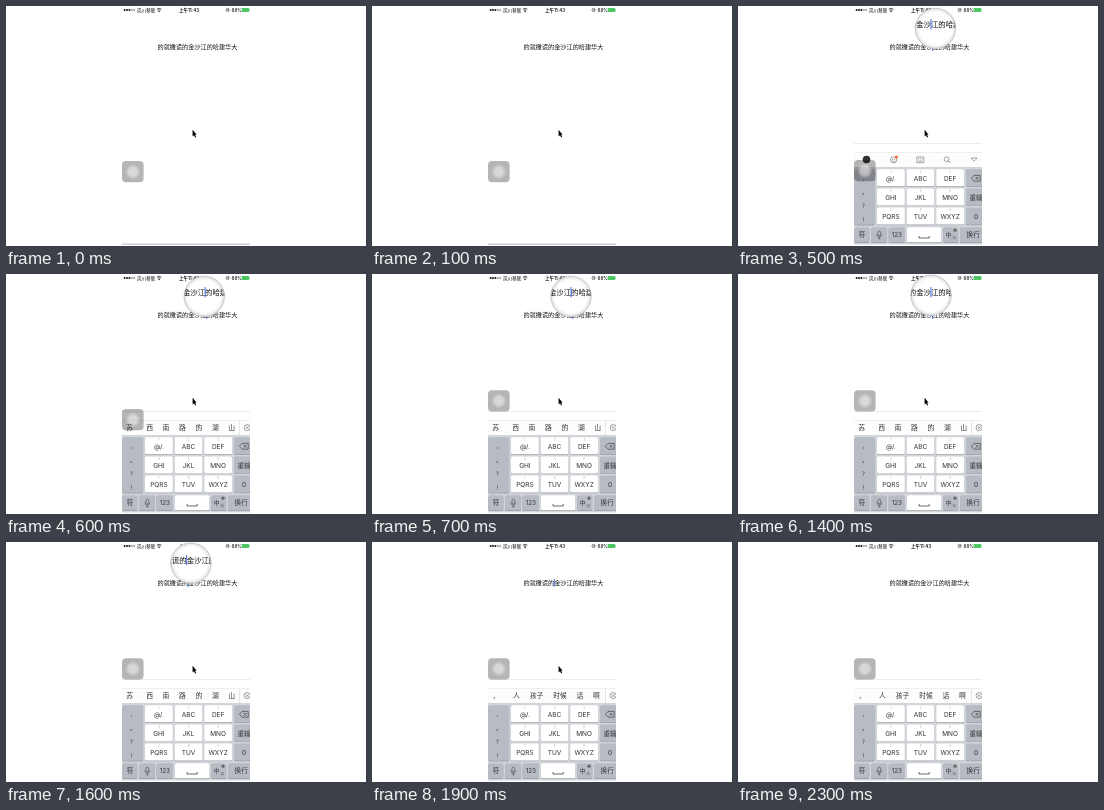
An HTML page with a canvas that plays this animation: 360 px wide and 240 px high, repeating every 2400 ms.

```html
<!DOCTYPE html>
<html lang="zh-CN">
<head>
<meta charset="utf-8">
<style>
html, body { margin: 0; width: 100%; height: 100%; overflow: hidden; background: #fff; }
canvas { display: block; width: 360px; height: 240px; }
</style>
</head>
<body>
<canvas id="stage" width="360" height="240"></canvas>
<script>
const ctx = document.getElementById('stage').getContext('2d');
const LOOP = 2400, TICK = 100;
const CJK = '"Noto Sans CJK SC", "Noto Sans CJK", sans-serif';
const LATIN = 'Inter, ' + CJK;
const LINE = '的就撒谎的金沙江的哈建华大';
const LINE_X = 151.5, LINE_Y = 41, PITCH = 6.15, ZOOM = 1.2;
const INK = '#333', ICON = '#666', BLUE = '#4468e8';

function text(str, x, y, size, { align = 'center', color = INK, font = CJK, weight = 400 } = {}) {
  ctx.font = `${weight} ${size}px ${font}`;
  ctx.textAlign = align;
  ctx.fillStyle = color;
  ctx.fillText(str, x, y + size * 0.37);
}

function rect(x, y, w, h, color) {
  ctx.fillStyle = color;
  ctx.fillRect(x, y, w, h);
}

function round(x, y, w, h, r, color) {
  ctx.beginPath();
  ctx.roundRect(x, y, w, h, r);
  ctx.fillStyle = color;
  ctx.fill();
}

function disc(x, y, r, color) {
  ctx.beginPath();
  ctx.arc(x, y, r, 0, Math.PI * 2);
  ctx.fillStyle = color;
  ctx.fill();
}

function ring(x, y, r, color = ICON, width = 0.6) {
  ctx.beginPath();
  ctx.arc(x, y, r, 0, Math.PI * 2);
  ctx.strokeStyle = color;
  ctx.lineWidth = width;
  ctx.stroke();
}

function path(d, color = ICON, width = 0.6) {
  ctx.strokeStyle = color;
  ctx.lineWidth = width;
  ctx.stroke(new Path2D(d));
}

function statusBar() {
  for (let i = 0; i < 5; i++) {
    if (i < 3) disc(118.6 + i * 2.4, 4, 1, '#111');
    else ring(118.6 + i * 2.4, 4, 0.8, '#333', 0.4);
  }
  text('岚川移联', 131, 4, 4.6, { align: 'left', color: '#111', weight: 500 });
  path('M150.8 3.2Q153.1 1.2 155.4 3.2M151.7 4.3Q153.1 3.1 154.5 4.3', '#111', 0.7);
  disc(153.1, 5.5, 0.7, '#111');
  text('上午11:43', 183, 4, 4.5, { font: LATIN, color: '#111', weight: 600 });
  ring(221.6, 4, 1.6, '#333', 0.6);
  path('M220.9 4H222.4V3', '#333', 0.6);
  text('88%', 225.6, 4, 4.5, { align: 'left', font: LATIN, color: '#111', weight: 500 });
  round(235.6, 2, 7.6, 4, 0.7, '#4cc764');
  rect(243.2, 3.4, 0.6, 1.4, '#4cc764');
}

function key(x, y, w, h, color = '#fff') {
  round(x, y + 0.7, w, h, 1.5, '#9a9ea5');
  round(x, y, w, h, 1.5, color);
}

function toolbar() {
  disc(128.5, 153.5, 3.8, '#333');
  ring(155.6, 153.9, 3.1);
  disc(154.6, 153.2, 0.5, ICON);
  disc(156.6, 153.2, 0.5, ICON);
  path('M154 154.8Q155.6 156.6 157.2 154.8');
  disc(158.4, 151, 1.5, '#f26a35');
  path('M178.8 151H185.8V156.6H178.8ZM180.4 155H184.2M180.2 152.8H181.2M181.9 152.8H182.9M183.6 152.8H184.6');
  ring(208.6, 153.2, 2.4);
  path('M210.3 154.9L212.2 156.8', ICON, 0.8);
  path('M233.2 152L236.2 155.2L239.2 152Z', ICON);
}

function candidates(words) {
  for (const [word, x] of words) text(word, x, 153.6, 6.8);
  rect(233, 147, 0.6, 14, '#d5d5d5');
  ring(241.2, 153.6, 3.1);
  path('M239.8 152.2L242.6 155M242.6 152.2L239.8 155');
}

const AFTER_RIVER = [['苏', 123.6], ['西', 143.6], ['南', 160], ['路', 176.4], ['的', 193], ['湖', 209.4], ['山', 225.6]];
const AFTER_DE = [['，', 124], ['人', 144.4], ['孩子', 164.6], ['时候', 188], ['话', 208], ['啊', 224.4]];

function keyboard(words) {
  const grey = '#b7bbc3';
  rect(116, 146, 128, 15, '#fdfdfd');
  rect(116, 146, 128, 0.6, '#e6e6e6');
  rect(116, 161, 128, 77.5, '#d1d4d9');
  if (words) candidates(words); else toolbar();

  key(116.5, 163.2, 20.6, 55.6, grey);
  [',', '。', '?', '!'].forEach((c, i) => text(c, c === '。' ? 127 : 125.4, 172 + i * 13.8, 6));

  const letters = ['@/.', 'ABC', 'DEF', 'GHI', 'JKL', 'MNO', 'PQRS', 'TUV', 'WXYZ'];
  letters.forEach((label, i) => {
    const x = 139 + (i % 3) * 29.6, y = 163.2 + Math.floor(i / 3) * 19.2;
    key(x, y, 27.8, 17);
    text(i + 1, x + 13.9, y + 2.6, 2.8, { font: LATIN, color: '#aaa' });
    text(label, x + 13.9, y + 9.2, 6.5, { font: LATIN });
  });

  for (let i = 0; i < 3; i++) key(228, 163.2 + i * 19.2, 20, 17, grey);
  path('M233.4 172.3L236 169.4H242.2V175.2H236ZM237.6 170.9L240.4 173.7M240.4 170.9L237.6 173.7', '#444', 0.7);
  text('重输', 238, 191.4, 6.6);
  text('0', 238, 210.6, 6.5, { font: LATIN });

  const y = 221.2, h = 15, mid = 229;
  key(116.5, y, 14.8, h, grey);
  text('符', 124, mid, 6.6);
  key(133, y, 15.8, h, grey);
  ctx.beginPath();
  ctx.roundRect(140, 225.2, 2.6, 4.6, 1.3);
  ctx.strokeStyle = '#444';
  ctx.lineWidth = 0.6;
  ctx.stroke();
  path('M138.8 228.4Q138.8 231 141.3 231Q143.8 231 143.8 228.4M141.3 231V232.8M140 232.8H142.6', '#444');
  key(150.6, y, 16.4, h, grey);
  text('123', 158.8, mid, 6.3, { font: LATIN });
  key(169, y, 34.4, h);
  path('M181 230V232H191.2V230', '#444', 0.8);
  key(205.2, y, 15, h, grey);
  text('中', 210.6, mid, 5.8);
  text('/英', 215.8, 231.4, 3.4, { color: ICON });
  disc(217, 224.2, 1.6, ICON);
  key(222, y, 26, h, grey);
  text('换行', 235.2, mid, 6.6);
}

function touchButton(y) {
  round(116, y, 21.6, 21.2, 4, 'rgba(0,0,0,.29)');
  for (const r of [7, 5.6, 4.4]) disc(126.9, y + 10.7, r, 'rgba(255,255,255,.2)');
}

function pointer() {
  const p = new Path2D('M186.6 123.8V130.4L188 129.2L189.1 131.6L190.1 131.1L189.1 128.8H190.6Z');
  ctx.fillStyle = '#000';
  ctx.fill(p);
}

const caretX = index => LINE_X + index * PITCH;

function lens(cx, cy, index) {
  const R = 20.3, at = caretX(index) - 1.6;
  ctx.save();
  ctx.shadowColor = 'rgba(0,0,0,.2)';
  ctx.shadowBlur = 1.5;
  disc(cx, cy, R, '#fff');
  ctx.restore();
  ctx.save();
  ctx.beginPath();
  ctx.arc(cx, cy, R, 0, Math.PI * 2);
  ctx.clip();
  const glass = ctx.createRadialGradient(cx, cy, R * 0.78, cx, cy, R);
  glass.addColorStop(0, 'rgba(200,200,200,0)');
  glass.addColorStop(1, 'rgba(190,190,190,.45)');
  disc(cx, cy, R, glass);
  text(LINE, at - index * PITCH * ZOOM, 18, PITCH * ZOOM, { align: 'left', color: '#111', weight: 500 });
  rect(at - 0.5, 13, 1, 10.4, BLUE);
  ctx.restore();
  ring(cx, cy, R - 0.3, '#bcbcbc', 0.7);
}

// Lens centre for a tick, or null while the finger is up.
function lensAt(s) {
  if (s >= 5 && s < 11) return [197.5 + Math.min(s - 5, 4) * 0.75, 22.4];
  if (s >= 12 && s < 18) return [185 + Math.max(16 - s, 0) * 4, 21.2];
  return null;
}

function draw(ms) {
  const s = Math.floor(ms / TICK);
  const open = s >= 5, glass = lensAt(s);
  rect(0, 0, 360, 240, '#fff');
  ctx.save();
  ctx.beginPath();
  ctx.rect(116, 0, 128, 240);
  ctx.clip();

  statusBar();
  text(LINE, LINE_X, LINE_Y, PITCH, { align: 'left', color: '#111' });
  if (open) {
    rect(116, 137, 128, 0.8, '#e8e8e8');
    keyboard(s < 6 ? null : s < 17 ? AFTER_RIVER : AFTER_DE);
  } else {
    rect(116, 237.4, 128, 1.6, '#cfcfcf');
  }
  touchButton(s < 5 ? 155 : s < 6 ? 154 : s < 7 ? 135 : 116.2);

  const index = glass ? Math.round((glass[0] - LINE_X) / PITCH) : s < 12 ? 8 : 5;
  if (open && s < 21) rect(caretX(index) - 0.5, 37.2, 1, 7.6, BLUE);
  if (glass) lens(...glass, index);
  if (s < 23) pointer();
  ctx.restore();
}

const start = performance.now();
function tick() {
  draw((performance.now() - start) % LOOP);
  requestAnimationFrame(tick);
}
tick();
</script>
</body>
</html>
```
